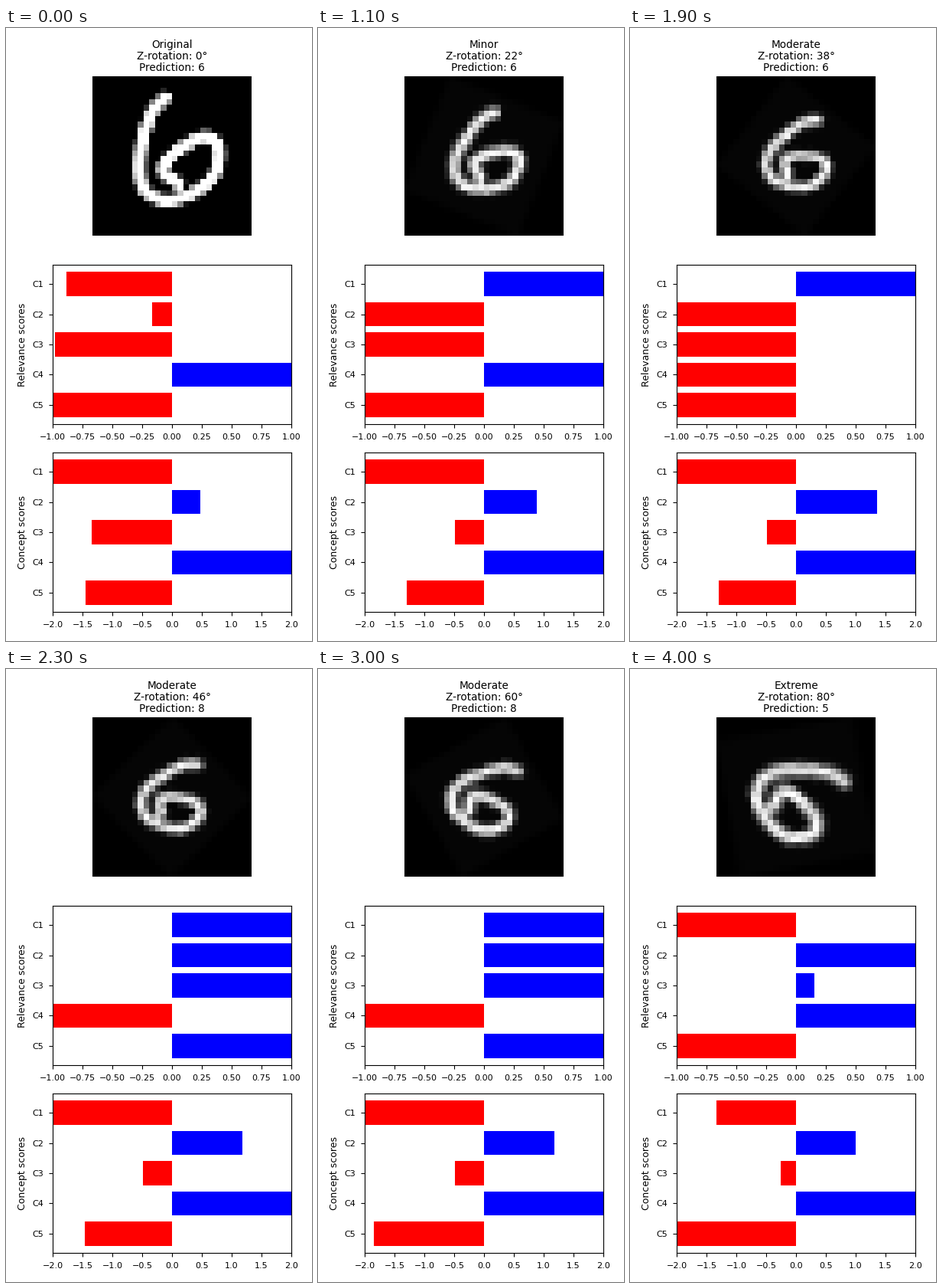
These frames come from a looping animation (400x800 px, 4.1 s). A matplotlib script:

```python
import numpy as np
import matplotlib.pyplot as plt
from matplotlib.animation import FuncAnimation

W, H, DPI = 400, 800, 100
FRAMES, INTERVAL = 41, 100
N = 28                      # digit raster size
CELL = 208 / N
TO_8, TO_5 = 22.5, 30.5     # moments when the prediction changes

plt.rcParams.update({"font.family": "DejaVu Sans", "font.size": 8})

# Key points of the pen stroke that writes the six, in stage pixels
PEN = np.array([
    (208, 91), (191, 110), (178, 150), (175, 190), (184, 214), (210, 225),
    (245, 215), (273, 190), (278, 156), (262, 142), (238, 151), (212, 171),
    (206, 188), (226, 203)], float)


def spline(points, steps=40):
    """Smooth curve through the points (Hermite, central tangents)."""
    tangent = np.gradient(points, axis=0)
    t = np.linspace(0, 1, steps)[:, None]
    a, b = 2 * t**3 - 3 * t**2 + 1, t**3 - 2 * t**2 + t
    c, d = 3 * t**2 - 2 * t**3, t**3 - t**2
    return np.vstack([
        a * points[k] + b * tangent[k] + c * points[k + 1] + d * tangent[k + 1]
        for k in range(len(points) - 1)])


def draw_digit():
    """Rasterise the stroke with a soft round nib."""
    path = (spline(PEN) - (113, 63)) / CELL
    y, x = np.mgrid[:N, :N] + 0.5
    dist = np.hypot(x[..., None] - path[:, 0], y[..., None] - path[:, 1])
    return np.clip(1.5 * (1.4 - dist.min(axis=2)), 0, 1)


def sample(img, x, y):
    """Bilinear lookup at pixel centres, zero outside."""
    size = len(img)
    pad = np.pad(img, 1)
    x = np.clip(x + 1, 0, size + 0.999)
    y = np.clip(y + 1, 0, size + 0.999)
    i, j = y.astype(int), x.astype(int)
    v, u = y - i, x - j
    top = pad[i, j] * (1 - u) + pad[i, j + 1] * u
    low = pad[i + 1, j] * (1 - u) + pad[i + 1, j + 1] * u
    return top * (1 - v) + low * v


def rotate(img, deg):
    """Turn clockwise on an enlarged canvas, then shrink back to N x N."""
    if deg == 0:
        return img
    c, s = np.cos(np.radians(deg)), np.sin(np.radians(deg))
    size = int(round((N - 1) * (c + s) + 1))
    y, x = np.mgrid[:size, :size] - (size - 1) / 2
    mid = (N - 1) / 2
    big = sample(img, x * c + y * s + mid, -x * s + y * c + mid)
    g = np.clip((np.arange(N) + 0.5) * size / N - 0.5, 0, size - 1)
    return sample(big, *np.meshgrid(g, g))


def flip(i, at, width=0.5):
    """Ramp from +1 to -1 around a moment."""
    return np.clip((at - i) / width, -1, 1)


def relevance_scores(i):
    start = np.exp(-1.5 * i)
    to_8, to_5 = flip(i, TO_8), flip(i, TO_5)
    return [
        -flip(i, 8.5, 1.5) * to_5 + 0.115 * start,
        -to_8 * to_5 * flip(i, 35.3, 2) + 0.833 * start,
        -to_8 * flip(i, 40.4, 2.6) + 0.02 * start,
        flip(i, 16.7, 2.3) * to_5,
        -to_8 * flip(i, 38, 1),
    ]


def concept_scores(i):
    start = np.exp(-1.5 * i)
    end = np.clip((i - 34) / 6, 0, 1)
    wave = np.cos(2 * np.pi * (i - 15) / 46)
    return [
        -2 + 0.667 * end,
        np.interp(i, [4, 19, 27, 34, 40], [0.474, 1.36, 1.01, 1.4, 1]),
        -0.49 - 0.856 * start + 0.234 * end,
        2,
        -1.65 + 0.42 * wave + 0.39 * start,
    ]


def level(deg):
    if deg == 0:
        return "Original"
    return "Minor" if deg <= 30 else "Moderate" if deg <= 60 else "Extreme"


def prediction(i):
    return 6 if i < TO_8 else 8 if i < TO_5 else 5


def add_axes(left, top, width, height):
    return fig.add_axes([left / W, 1 - (top + height) / H, width / W, height / H])


def add_bars(top, limit, label):
    ax = add_axes(61, top, 312, 208)
    names = [f"C{n}" for n in range(1, 6)]
    bars = ax.barh(range(5), [limit] * 5, height=0.8)
    ax.set_yticks(range(5), names)
    ax.set_ylim(4.64, -0.64)
    ax.set_xlim(-limit, limit)
    ax.set_xticks(np.linspace(-limit, limit, 9))
    ax.tick_params(labelsize=8, pad=5)
    fig.text(25 / W, 1 - (top + 104) / H, label, rotation=90, fontsize=9,
             ha="center", va="baseline", rotation_mode="anchor")
    return bars


def set_bars(bars, values):
    for bar, value in zip(bars, values):
        bar.set_width(value)
        bar.set_facecolor("red" if value < 0 else "blue")


fig = plt.figure(figsize=(W / DPI, H / DPI), dpi=DPI, facecolor="white")
digit = draw_digit()
paper = np.ones((N, N))

view = add_axes(113, 63, 208, 208)
view.axis("off")
picture = view.imshow(digit, cmap="gray", vmin=0, vmax=1,
                      interpolation="nearest", aspect="auto")
title = view.set_title("", fontsize=9.8, pad=5.3, linespacing=1.09)
relevance = add_bars(309, 1, "Relevance scores")
concept = add_bars(554, 2, "Concept scores")


def update(i):
    deg = 2 * i
    img = rotate(digit, deg)
    img = img / img.max()
    if deg:
        img = 0.98 * img + 0.02 * rotate(paper, deg)
    picture.set_data(img)
    title.set_text(f"{level(deg)}\nZ-rotation: {deg}°\nPrediction: {prediction(i)}")
    set_bars(relevance, relevance_scores(i))
    set_bars(concept, concept_scores(i))
    return [picture, title, *relevance, *concept]


anim = FuncAnimation(fig, update, frames=FRAMES, interval=INTERVAL,
                     repeat=True, repeat_delay=0, blit=False)
plt.show()
```
